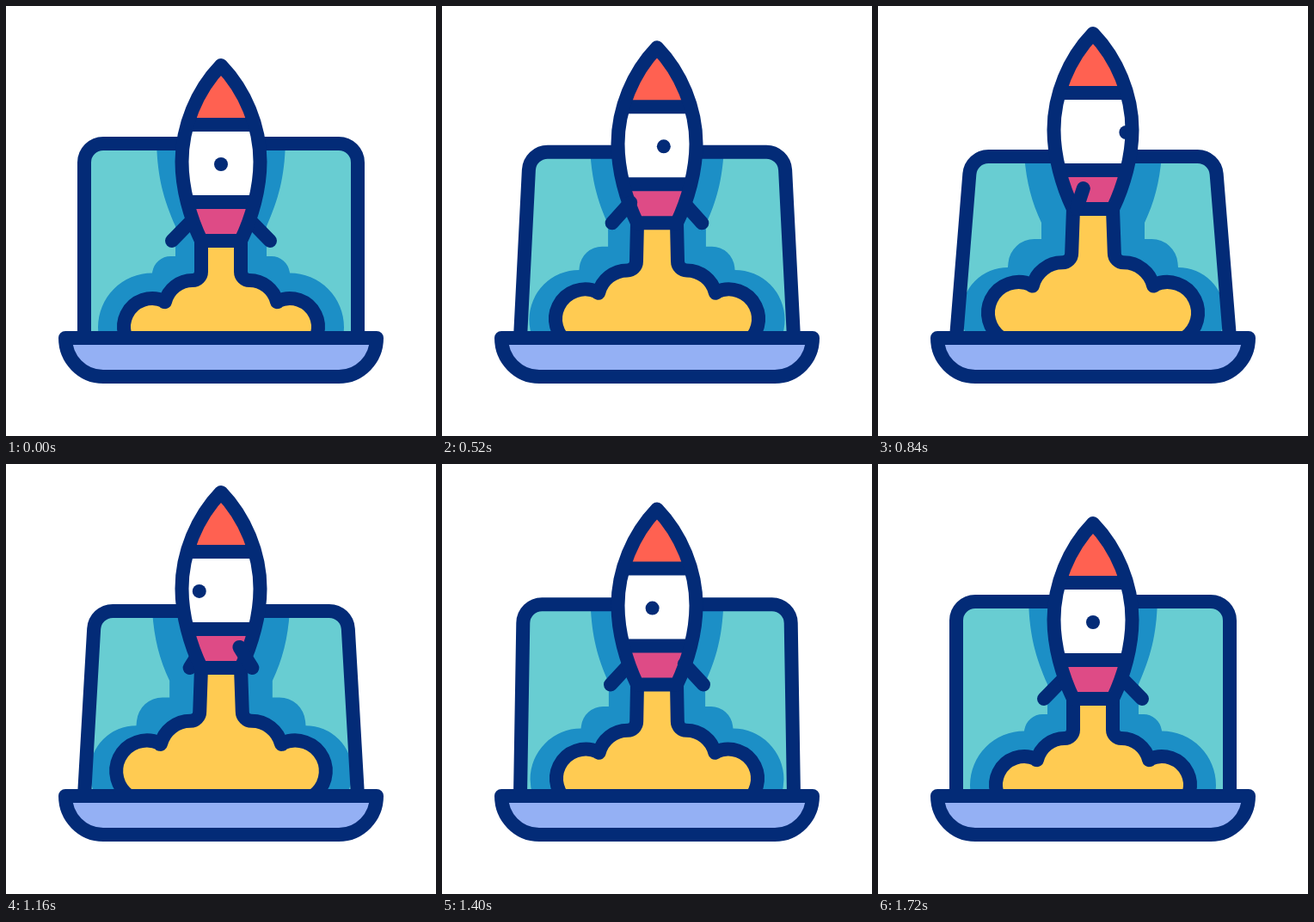
An HTML page with a canvas that plays this animation: 500 px wide and 500 px high, repeating every 2 s.

```html
<!DOCTYPE html>
<html lang="en">
<head>
<meta charset="utf-8">
<title>Rocket launch</title>
<style>
  html, body { margin: 0; width: 100%; height: 100%; overflow: hidden; background: #fff; }
  canvas { display: block; }
</style>
</head>
<body>
<canvas id="stage" width="500" height="500"></canvas>
<script>
const ctx = document.getElementById('stage').getContext('2d');
const LOOP = 2000, STEP = 40;
const NAVY = '#032b77', TEAL = '#68cdd2', BLUE = '#1c8fc6', YELLOW = '#ffcb52',
      RED = '#ff6151', PINK = '#de4b86', LAVENDER = '#94b0f4', WHITE = '#fff';

const hull = new Path2D('M0 69C-28 98-45.5 140-45.5 181C-45.5 212-36 246-23 273H23C36 246 45.5 212 45.5 181C45.5 140 28 98 0 69Z');
const tray = new Path2D('M-181 386H181A44 45 0 0 1 137 431H-137A44 45 0 0 1-181 386Z');

const mix = (a, b, k) => a + (b - a) * k;
const ease = (t, start, end) => {
  const k = Math.min(1, Math.max(0, (t - start) / (end - start)));
  return k * k * (3 - 2 * k);
};

function fill(path, color) {
  ctx.fillStyle = color;
  ctx.fill(path);
}

function line(x1, y1, x2, y2) {
  ctx.beginPath();
  ctx.moveTo(x1, y1);
  ctx.lineTo(x2, y2);
  ctx.stroke();
}

function bothSides(draw) {
  for (const side of [-1, 1]) {
    ctx.save();
    ctx.scale(side, 1);
    draw();
    ctx.restore();
  }
}

function drawScreen(tilt, lift) {
  const top = 160 + 15 * tilt, corner = 159 - 17 * tilt;
  const screen = new Path2D();
  screen.moveTo(-159, 386);
  screen.arcTo(-corner, top, 0, top, 22);
  screen.arcTo(corner, top, 159, 386, 22);
  screen.lineTo(159, 386);
  screen.closePath();
  fill(screen, TEAL);
  ctx.save();
  ctx.clip(screen);
  bothSides(() => fill(glowHalf(lift), BLUE));
  ctx.restore();
  ctx.stroke(screen);
}

function glowHalf(lift) {
  const at = (a, b) => mix(a, b, lift);
  const stem = at(53, 60), notchX = at(80, 99), notchY = at(310.5, 304);
  const r = at(63, 54), puff = at(28.5, 40.5);
  const glow = new Path2D();
  glow.moveTo(0, 150);
  glow.lineTo(at(75, 81), 150);
  glow.bezierCurveTo(at(75, 80), 195, at(68, 74), 222, stem, at(256, 252));
  glow.lineTo(stem, at(291, 271));
  glow.arcTo(notchX - 3, at(291, 271), notchX, notchY, puff * 0.75);
  glow.lineTo(notchX, notchY);
  glow.arc(notchX, notchY + r, r, -Math.PI / 2, 0.4);
  glow.lineTo(0, 400);
  return glow;
}

function drawCloudHalf(lift) {
  const k = 1 + 0.08 * lift;
  const y = v => 340 - 19 * lift + k * (v - 340);
  const nozzle = 273 - 37 * lift;
  const edge = new Path2D();
  edge.moveTo(23, nozzle);
  edge.lineTo(23 * k, y(309));
  edge.arc(33 * k, y(309), 10 * k, Math.PI, Math.PI / 2, true);
  edge.arc(33 * k, y(352), 33 * k, -Math.PI / 2, -0.24);
  edge.lineTo(66 * k, y(344));
  edge.arc(80 * k, y(373), 33 * k, -2.02, 0.96);
  const body = new Path2D(edge);
  body.lineTo(0, y(400));
  body.lineTo(0, nozzle);
  fill(body, YELLOW);
  ctx.stroke(edge);
}

function drawRocket(spin) {
  const u = spin - 0.5;
  const finX = u * (179 - 130 * Math.abs(u));
  const fin = x => line(x / 1.7, 249, x, 273);
  const dotX = spin < 0.5 ? 100 * spin : 100 * (spin - 1);

  fin(-finX);
  ctx.save();
  ctx.clip(hull);
  for (const [color, top, height] of [[RED, 60, 78], [WHITE, 138, 90], [PINK, 228, 50]]) {
    ctx.fillStyle = color;
    ctx.fillRect(-60, top, 120, height);
  }
  line(-60, 138, 60, 138);
  line(-60, 228, 60, 228);
  ctx.fillStyle = NAVY;
  ctx.beginPath();
  ctx.arc(dotX, 184, 8, 0, 2 * Math.PI);
  ctx.fill();
  ctx.restore();
  ctx.stroke(hull);
  fin(finX);
}

function draw(t) {
  const tilt = ease(t, 120, 790) - ease(t, 930, 1600);
  const lift = ease(t, 240, 760) - ease(t, 1110, 1650);
  const spin = ease(t, 300, 1580);

  ctx.setTransform(1, 0, 0, 1, 250, 0);
  ctx.clearRect(-250, 0, 500, 500);
  ctx.strokeStyle = NAVY;
  ctx.lineWidth = 16;
  ctx.lineCap = ctx.lineJoin = 'round';

  drawScreen(tilt, lift);
  bothSides(() => drawCloudHalf(lift));
  ctx.save();
  ctx.translate(0, -37 * lift);
  drawRocket(spin);
  ctx.restore();
  fill(tray, LAVENDER);
  ctx.stroke(tray);
}

function frame() {
  const t = performance.now() % LOOP;
  draw(Math.floor(t / STEP) * STEP);
  requestAnimationFrame(frame);
}
frame();
</script>
</body>
</html>
```
